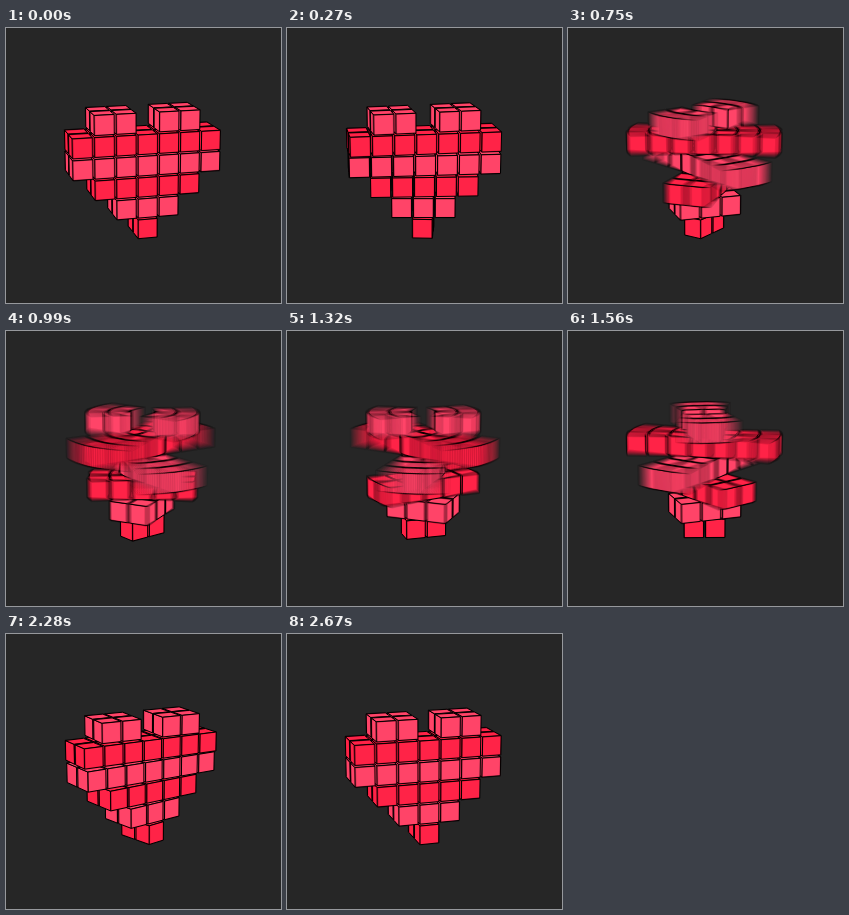
Recreate the animation shown at these times as an HTML page with a canvas. Size 275x275 px, loop 2.7 s.

```html
<!DOCTYPE html>
<html lang="en">
<head>
<meta charset="utf-8">
<title>Twisting voxel heart</title>
<style>
  html, body { margin: 0; height: 100%; overflow: hidden; background: #262626; }
  canvas { display: block; width: 100vw; height: 100vh; }
</style>
</head>
<body>
<canvas id="stage" width="275" height="275"></canvas>
<script>
const SIZE = 275, STEP = 30, STEPS = 90, SAMPLES = 18;
const ROWS = 6, UNIT = 21.5, HALF = 9.75;
const CX = 136.4, CY = 143.2, EYE = 900;
const RAD = Math.PI / 180, SIN = Math.sin(15 * RAD), COS = Math.cos(15 * RAD);
const BG = '#262626', PINK = '#ff4468', RED = '#ff2347';

const out = document.getElementById('stage').getContext('2d');
const buffer = document.createElement('canvas');
buffer.width = buffer.height = SIZE;
const pen = buffer.getContext('2d');
pen.lineWidth = 1;
pen.lineJoin = 'round';
pen.strokeStyle = '#000';

// Two lobes on top, then layers that narrow to a point.
function filled(row, col) {
  const d = Math.abs(col);
  return row ? d <= Math.min(3, 5 - row) : d === 1 || d === 2;
}

// Ease in and out around an early midpoint.
function ease(t) {
  const mid = .43;
  return t < mid
    ? .5 * (t / mid) ** 2.8
    : 1 - .5 * ((1 - t) / (1 - mid)) ** 3.1;
}

// Spin about the vertical axis, then look down from slightly above.
function project([x, y, z], c, s) {
  const px = x * c - z * s, pz = x * s + z * c;
  const k = EYE / (EYE - pz * COS + y * SIN);
  return [CX + px * k, CY + (y * COS + pz * SIN) * k];
}

function faceCorners(center, axis, sign) {
  const u = (axis + 1) % 3, v = (axis + 2) % 3, corners = [];
  for (let k = 0; k < 4; k++) {
    const p = [...center];
    p[axis] += sign * HALF;
    p[u] += (k === 0 || k === 3 ? sign : -sign) * HALF;
    p[v] += (k < 2 ? 1 : -1) * HALF;
    corners.push(p);
  }
  return corners;
}

function drawCube(center, c, s) {
  for (let axis = 0; axis < 3; axis++)
    for (const sign of [-1, 1]) {
      const quad = faceCorners(center, axis, sign).map(p => project(p, c, s));
      const [a, b, d] = quad;
      const area = (b[0] - a[0]) * (d[1] - a[1]) - (b[1] - a[1]) * (d[0] - a[0]);
      if (area <= 0) continue;
      pen.beginPath();
      for (const q of quad) pen.lineTo(q[0], q[1]);
      pen.closePath();
      pen.fill();
      pen.stroke();
    }
}

function drawLayer(row, angle) {
  const c = Math.cos(angle), s = Math.sin(angle), cubes = [];
  for (let col = -3; col <= 3; col++)
    if (filled(row, col))
      for (const side of [-.5, .5])
        cubes.push([col * UNIT, (row - 2.5) * UNIT, side * UNIT]);
  const depth = p => p[0] * s + p[2] * c;
  cubes.sort((a, b) => depth(a) - depth(b));
  pen.fillStyle = row % 2 ? RED : PINK;
  for (const cube of cubes) drawCube(cube, c, s);
}

// The whole heart makes a steady half turn; each layer adds one more twist back.
function drawHeart(t) {
  pen.fillStyle = BG;
  pen.fillRect(0, 0, SIZE, SIZE);
  const turn = 180 * t - 15, twist = 360 * ease(t);
  for (let row = ROWS - 1; row >= 0; row--)
    drawLayer(row, (turn - (ROWS - 1 - row) * twist) * RAD);
}

// Averages several moments to get motion blur.
function render(step) {
  for (let i = 0; i < SAMPLES; i++) {
    const t = (step + (i + .5) / SAMPLES - .5) / STEPS;
    drawHeart((t + 1) % 1);
    out.globalAlpha = 1 / (i + 1);
    out.drawImage(buffer, 0, 0);
  }
}

const start = performance.now();
let shown = -1;
function tick() {
  const step = Math.floor((performance.now() - start) / STEP) % STEPS;
  if (step !== shown) render(shown = step);
  requestAnimationFrame(tick);
}
tick();
</script>
</body>
</html>
```
